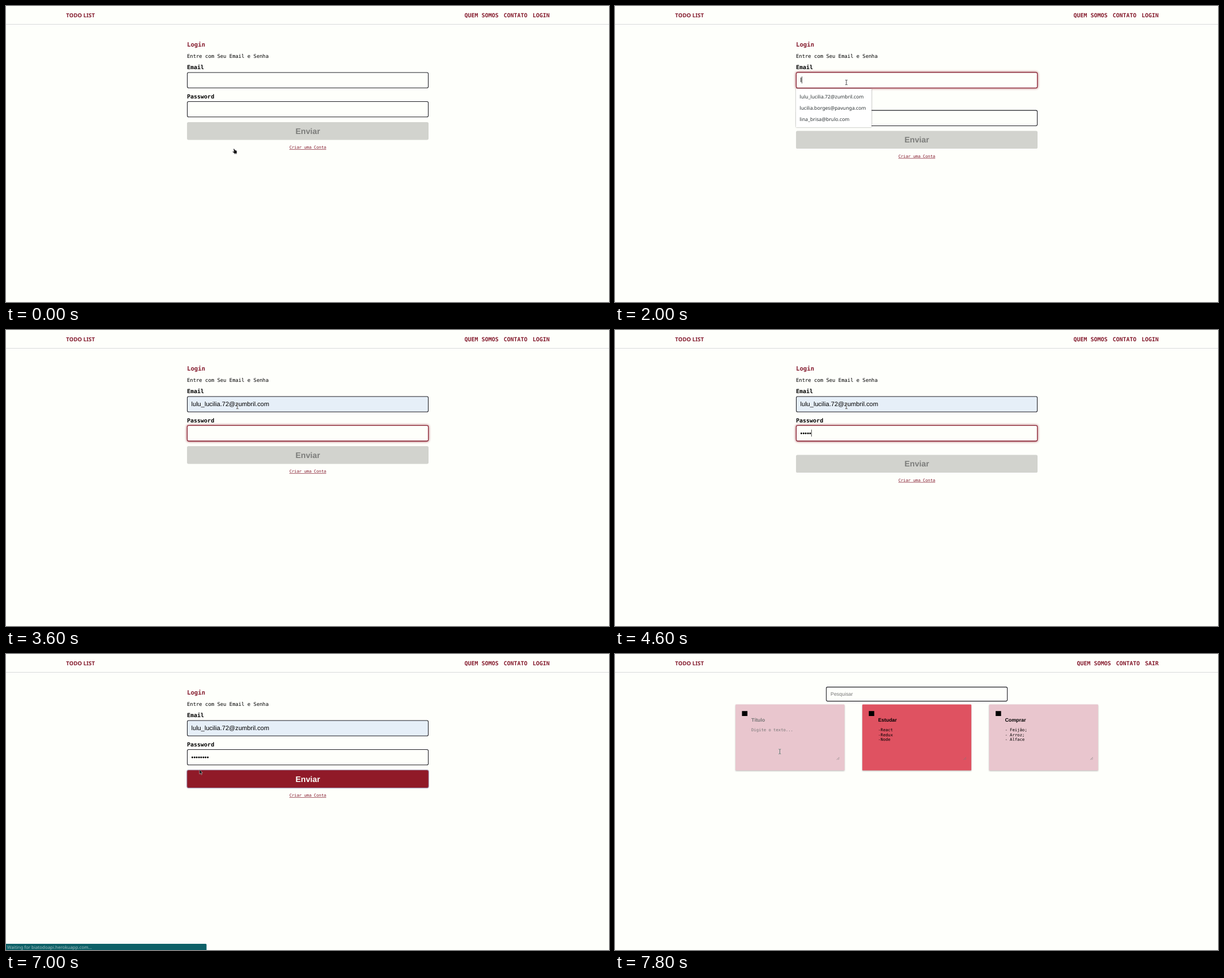
Write an HTML page that moves like this. It is 1066 px wide and 525 px high and loops after 8 s.

```html
<!DOCTYPE html>
<html lang="pt-BR">
<head>
<meta charset="utf-8">
<title>Todo list</title>
<style>
  html, body { margin: 0; height: 100%; overflow: hidden; background: #fefffb; }
  svg { display: block; text-rendering: geometricPrecision; }
  .mono { font-family: "DejaVu Sans Mono", monospace; }
  .arial { font-family: "Liberation Sans", Arial, sans-serif; }
  .noto { font-family: "Noto Sans", sans-serif; }
  .bold { font-weight: 700; }
</style>
</head>
<body>
<svg id="stage" width="1066" height="525" viewBox="0 0 1066 525"></svg>
<script>
const stage = document.getElementById('stage');
const LOOP = 8000, RUBY = '#841b2d', BUTTON = '#901a28', GRAY = '#757575';
const EMAIL = 'lulu_lucilia.72@zumbril.com';
const EMAILS = [EMAIL, 'lucilia.borges@pavunga.com', 'lina_brisa@brulo.com'];
const ERROR_SHIFT = 15.6;

// Each step changes some fields of the state; the others carry over.
const start = {
  page: 'login', pointer: 'hand', x: 400, y: 252, email: '', password: 0, filled: false,
  emailGlow: 0, passwordGlow: 0, caret: '', options: 0, highlight: false,
  emailError: false, passwordError: false, enabled: false, ring: false, status: false, notes: false
};
const steps = [
  [0, {}],
  [200, { x: 467, y: 237 }],
  [600, { pointer: 'beam', x: 428, y: 184 }],
  [800, { x: 409, y: 135.5, emailGlow: .5, caret: 'email' }],
  [1000, { emailGlow: 1 }],
  [1200, { options: 3 }],
  [1400, { caret: '' }],
  [1600, { caret: 'email' }],
  [2000, { email: EMAIL.slice(0, 1), emailError: true }],
  [2200, { email: EMAIL.slice(0, 4), options: 1 }],
  [2600, { highlight: true }],
  [2800, { email: EMAIL, filled: true, caret: '' }],
  [3000, { options: 0, highlight: false, emailError: false }],
  [3200, { emailGlow: .5, passwordGlow: .3 }],
  [3400, { emailGlow: 0, passwordGlow: .7 }],
  [3600, { passwordGlow: 1 }],
  [4000, { password: 1, caret: 'password', passwordError: true }],
  [4200, { password: 2 }],
  [4400, { password: 4 }],
  [4600, { password: 5 }],
  [4800, { password: 7, passwordError: false, enabled: true }],
  [5000, { password: 8 }],
  [5400, { caret: '', pointer: 'arrow', x: 545.7, y: 114.5 }],
  [5600, { pointer: 'beam', x: 450, y: 184 }],
  [5800, { pointer: 'hand', x: 372, y: 216, passwordGlow: .5, ring: true }],
  [6000, { passwordGlow: 0 }],
  [6400, { x: 366, y: 213 }],
  [6600, { x: 361, y: 211 }],
  [7000, { pointer: 'arrow', x: 342, y: 204.8, status: true }],
  [7200, { page: 'notes', pointer: 'beam', y: 208 }],
  [7600, { notes: true }],
  [7800, { status: false, x: 291.3, y: 173 }]
];
let last = start;
const states = steps.map(([time, change]) => ({ time, state: last = { ...last, ...change } }));

const text = (x, y, size, cls, fill, content, extra = '') =>
  `<text x="${x}" y="${y}" font-size="${size}" class="${cls}" fill="${fill}" ${extra}>${content}</text>`;
const rect = (x, y, w, h, fill, extra = '') =>
  `<rect x="${x}" y="${y}" width="${w}" height="${h}" fill="${fill}" ${extra}/>`;
const path = (d, extra) => `<path d="${d}" ${extra}/>`;

function header(lastLink) {
  let right = 961, links = '';
  for (const label of [lastLink, 'CONTATO', 'QUEM SOMOS']) {
    links += text(right, 19.7, 10, 'mono bold', RUBY, label, 'text-anchor="end"');
    right -= label.length * 6.02 + 9;
  }
  return text(106.3, 19.6, 9.7, 'noto', RUBY, 'TODO LIST', 'font-weight="600"') + links +
    rect(0, 32, 1066, 1, '#d8dadc');
}

function field(id, label, y, value, fill, glow, caret) {
  const border = glow > .4 ? RUBY : '#1b1b22';
  const shadow = glow ? rect(320, y, 427, 28.4, RUBY,
    `rx="2.8" opacity="${glow}" style="filter:drop-shadow(0 0 2.2px ${BUTTON})"`) : '';
  return text(320, y - 5, 10, 'mono bold', '#000', label) + shadow +
    rect(320.5, y + .5, 426, 27.3, fill, `rx="2.3" stroke="${border}" stroke-width="1.05"`) +
    text(327.5, y + 17.9, 11.1, 'arial', '#000', value, `id="${id}"`) +
    (caret === id ? path(`M328 ${y + 7.6}v12.4`, 'id="caret" stroke="#222" stroke-width=".8"') : '');
}

function dropdown(count, highlight) {
  const rows = EMAILS.slice(0, count).map((address, i) =>
    text(326.5, 163.5 + i * 20, 8.67, 'noto', '#2e3436', address)).join('');
  return rect(320, 147, 133.5, 8 + count * 20, '#fff',
    'style="filter:drop-shadow(0 .8px 1.2px rgba(0,0,0,.45))"') +
    (highlight ? rect(320, 151, 133.5, 20, '#c5c7c5') : '') + rows;
}

function loginPage(s) {
  const passwordY = 169 + s.emailError * ERROR_SHIFT;
  const low = (s.emailError || s.passwordError) * ERROR_SHIFT;
  const ring = s.ring ? rect(319.8, 205.8, 427.4, 31.8, 'none', 'rx="2.8" stroke="#9d8aa8" stroke-width="1.1"') : '';
  return header('LOGIN') +
    text(320, 72, 10.67, 'mono bold', RUBY, 'Login') +
    text(320, 91.8, 8.89, 'mono', '#000', 'Entre com Seu Email e Senha') +
    field('email', 'Email', 117.4, s.email, s.filled ? '#e6eff8' : '#fefffb', s.emailGlow, s.caret) +
    field('password', 'Password', passwordY, '•'.repeat(s.password), '#fefffb', s.passwordGlow, s.caret) +
    `<g transform="translate(0 ${low})">` +
    rect(320, 206, 427, 31.4, s.enabled ? BUTTON : '#d2d3ce', 'rx="2.6"') + ring +
    text(533.5, 226.5, 14.22, 'arial bold', s.enabled ? '#fefffb' : '#7c7d7b', 'Enviar', 'text-anchor="middle"') +
    text(533.5, 253.2, 7.22, 'mono', RUBY, 'Criar uma Conta', 'text-anchor="middle" text-decoration="underline"') +
    '</g>' + (s.options ? dropdown(s.options, s.highlight) : '');
}

function card(x, fill, title, lines, ink) {
  return rect(x, 89.6, 192.7, 117, fill,
    'rx="1.2" style="filter:drop-shadow(0 1px 1px rgba(0,0,0,.28))"') +
    rect(x + 11.5, 101.2, 9.6, 8.8, '#000') +
    text(x + 28, 119.8, 8.89, 'arial bold', ink, title) +
    lines.map((line, i) => text(x + 28, 137.4 + i * 8.4, 7.22, 'mono', ink, line)).join('') +
    path(`M${x + 179} 187.5l4.5 -4.5m-2 4.5l2 -2`, 'stroke="#777" stroke-width=".7"');
}

function notesPage(s) {
  return header('SAIR') +
    rect(373.5, 58.6, 320, 25, '#fefffb', 'rx="2.3" stroke="#1b1b22" stroke-width="1.05"') +
    text(381, 74.2, 8.89, 'arial', GRAY, 'Pesquisar') +
    card(213, '#e9c6ce', 'Título', ['Digite o texto...'], GRAY) +
    (s.notes ? card(437.2, '#df5261', 'Estudar', ['-React', '-Redux', '-Node'], '#000') +
      card(661.4, '#e9c6ce', 'Comprar', ['- Feijão;', '- Arroz;', '- Alface'], '#000') : '');
}

const statusBar = () => rect(-3, 514, 357.5, 14, '#0d6067', 'rx="1.5"') +
  text(2, 522.9, 7.9, 'noto', '#a3c0c2', 'Waiting for biatodoapi.herokuapp.com...');

const pointers = {
  arrow: path('M0 0V8.2L1.9 6.5 3.2 9.4 4.5 8.8 3.2 6H5.6Z', 'fill="#111" stroke="#eee" stroke-width=".5"'),
  hand: path('M2 1.4Q3 .6 3.8 1.8L4.8 3.6 7 4.2Q8.3 4.7 8.2 6.2L8 9.8H3.4L2.6 8.2 .2 6.8Q.2 5.8 1.4 5.9L3 6.3Z',
    'fill="#111" stroke="#eee" stroke-width=".5"') + path('M3.2 10.2H8.2', 'stroke="#888" stroke-width=".8"'),
  beam: ['stroke="#fff" stroke-width="1.9"', 'stroke="#333" stroke-width=".9"'].map(stroke =>
    path('M-2 -4.1H-.6L0 -3.6 .6 -4.1H2M0 -3.6V3.6M-2 4.1H-.6L0 3.6 .6 4.1H2', `fill="none" ${stroke}`)).join('')
};

function render(s) {
  stage.innerHTML = (s.page === 'login' ? loginPage(s) : notesPage(s)) +
    (s.status ? statusBar() : '') +
    `<g transform="translate(${s.x} ${s.y})">${pointers[s.pointer]}</g>`;
  const caret = document.getElementById('caret');
  if (caret) {
    const width = document.getElementById(s.caret).getComputedTextLength();
    caret.setAttribute('transform', `translate(${width} 0)`);
  }
}

let shown;
function tick() {
  const now = performance.now() % LOOP;
  const { state } = states.findLast(step => step.time <= now);
  if (state !== shown) render(shown = state);
  requestAnimationFrame(tick);
}
tick();
</script>
</body>
</html>
```
